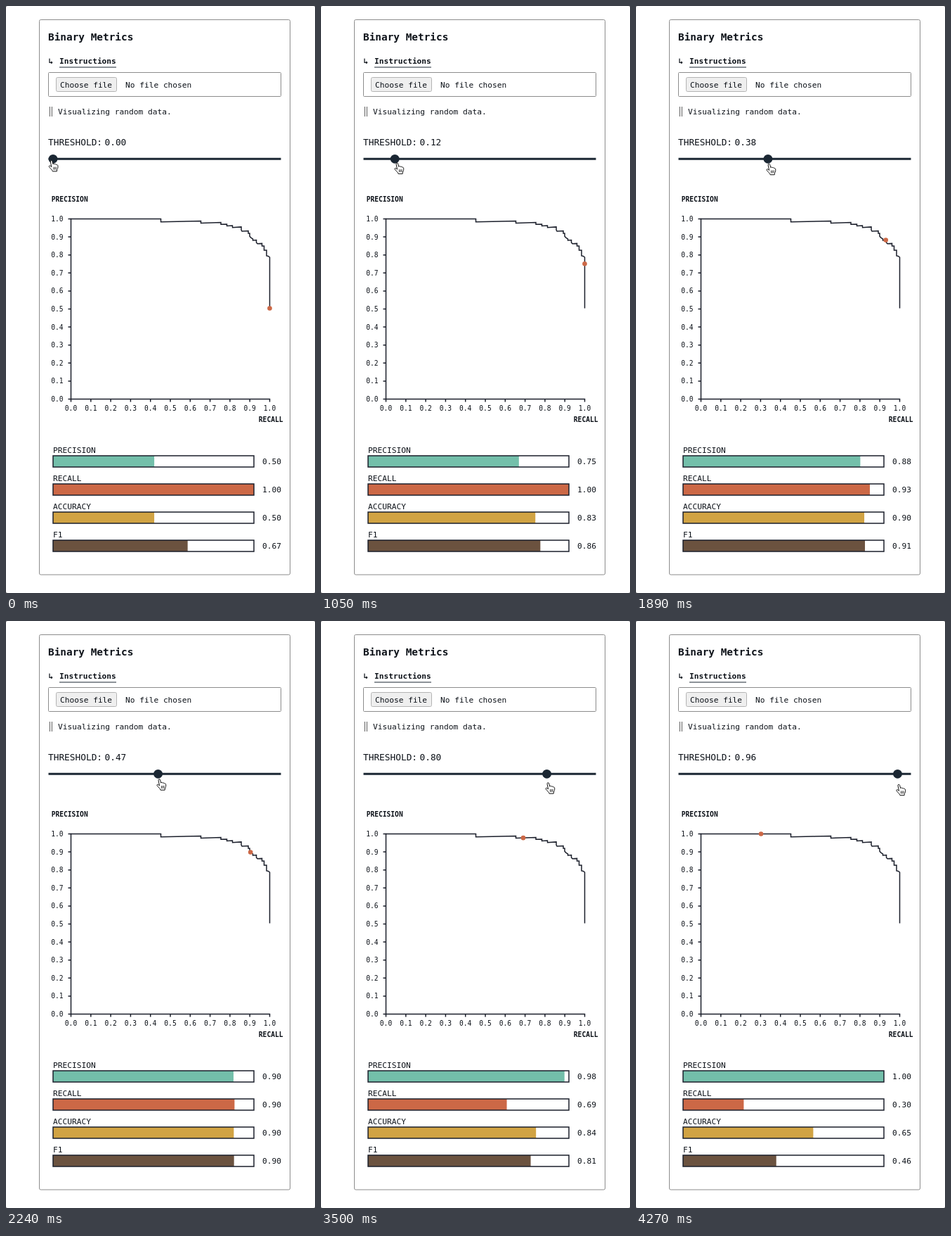
Recreate the animation shown at these times as an HTML page. Size 440x834 px, loop 4.34 s.

```html
<!DOCTYPE html>
<html lang="en">
<head>
<meta charset="utf-8">
<title>Binary Metrics</title>
<style>
  html, body { margin: 0; height: 100%; overflow: hidden; background: #888; }
  svg { display: block; width: 440px; height: 834px; font: 11.2px "DejaVu Sans Mono", monospace; }
  text { fill: #0c1118; white-space: pre; }
  .bold { font-weight: bold; }
  .title { font-size: 14.4px; }
  .large { font-size: 12.8px; }
  .small { font-size: 9.6px; }
  .box { fill: #fff; stroke: #8c8c8c; }
  .line { fill: none; stroke: #1b1f2b; stroke-width: 1.5; }
  .end { text-anchor: end; }
  .mid { text-anchor: middle; }
</style>
</head>
<body>
<svg id="stage" viewBox="0 0 440 834">
  <rect width="440" height="834" rx="2.5" fill="#fff"/>
  <rect class="box" x="47.5" y="19.5" width="357" height="788.5" rx="2"/>
  <text class="bold title" x="60" y="48.5">Binary Metrics</text>
  <text class="bold" x="60.5" y="82">↳</text>
  <text class="bold" x="76" y="82">Instructions</text>
  <path d="M76 87H157" stroke="#1b2733"/>
  <rect class="box" x="60.5" y="94.5" width="331" height="34" rx="1"/>
  <rect x="71.5" y="101.5" width="86" height="20" rx="2" fill="#efefef" stroke="#b4b4b4"/>
  <text x="77" y="115.5">Choose file</text>
  <text x="170" y="115.5">No file chosen</text>
  <path d="M62.4 143V157M65.4 143V157" stroke="#444" stroke-width=".9"/>
  <text x="74" y="154">Visualizing random data.</text>
  <text class="large" x="60" y="198">THRESHOLD:</text>
  <text class="large" x="140.5" y="198" id="threshold"></text>
  <path d="M60.5 217.3H391.5" stroke="#1b2733" stroke-width="3"/>
  <circle id="thumb" cy="217.3" r="6.4" fill="#1b2733"/>
  <text class="bold small" x="64.7" y="278.3">PRECISION</text>
  <text class="bold small end" x="394.5" y="590.5">RECALL</text>
  <g id="axes"></g>
  <path id="curve" class="line" d="M375.5 429.5V357L373.5 355.5 371 355V347H367.5V341H364.5V337.4L358 337.8
    356.5 336V332.5L351.5 333V331L349 329.3 347 327.3V323H345V319.5L336 320 335 318V313.9L322.5 314.7V312
    L314.5 312.5V310L306 310.3V307.5L277.5 308.5V305.5L220.5 306.8V302.5H92.5"/>
  <circle id="dot" r="3.3" fill="#cc6846"/>
  <g id="bars"></g>
  <g id="hand" stroke="#111" stroke-linecap="round" stroke-linejoin="round">
    <path fill="#fff" d="M4.3 9.6 2.9 2.4C2.6.5 5 .1 5.5 1.9L6.5 6C7 5.2 8.5 5.2 9 6.2 9.8 5.6 11 6 11.3 6.9
      12.4 6.5 13.4 7.2 13.5 8.4 13.8 11 13.1 12.3 12.2 14L12 16.2H5.9C5.5 14 3 12.6 .9 9.7 .3 8.4 2 7.6 3 8.6Z"/>
    <path stroke-width=".8" d="M7.3 10.5V13.5M9.1 10.4V13.5M10.9 10.3V13.4"/>
  </g>
</svg>
<script>
const $ = id => document.getElementById(id);
const STEP = 70, STEPS = 62, BASE_RATE = 0.504;
const LEFT = 92.5, BOTTOM = 558.5, PLOT_W = 283, PLOT_H = 256;

function add(parent, tag, attrs, text = "") {
  const el = document.createElementNS("http://www.w3.org/2000/svg", tag);
  for (const key in attrs) el.setAttribute(key, attrs[key]);
  el.textContent = text;
  parent.append(el);
  return el;
}

// Piecewise linear interpolation through [x, y] pairs
function lerp(keys, x) {
  const i = Math.max(1, keys.findIndex(k => k[0] >= x));
  const [x0, y0] = keys[i - 1], [x1, y1] = keys[i];
  return y0 + (y1 - y0) * (x - x0) / (x1 - x0);
}

// Step -> slider value, step -> hand height, threshold -> distance along the curve
const dragKeys = [[0, 0], [4, 0], [7, 0.008], [10, 0.03], [14, 0.1], [21, 0.27], [32, 0.47], [40, 0.6], [50, 0.8], [61, 0.96]];
const handKeys = [[0, 218.7], [1, 219.3], [4, 219.5], [10, 221.5], [21, 223], [32, 224], [40, 225.5], [50, 229], [61, 231.5]];
const curveKeys = [[0, 0], [0.03, 27.5], [0.08, 49], [0.15, 74], [0.27, 102.1], [0.47, 125.2], [0.6, 156.5], [0.8, 207.1], [0.9, 255], [0.96, 324.4]];

for (let i = 0; i <= 10; i++) {
  const x = LEFT + PLOT_W * i / 10, y = BOTTOM - PLOT_H * i / 10, label = (i / 10).toFixed(1);
  add($("axes"), "path", { class: "line", d: `M${x} ${BOTTOM}v4M${LEFT} ${y}h-4` });
  add($("axes"), "text", { class: "small mid", x, y: 574.5 }, label);
  add($("axes"), "text", { class: "small end", x: 81.5, y: y + 3.5 }, label);
}
add($("axes"), "path", { class: "line", d: "M92.5 301.8V558.5H376.2" });

const bars = [["PRECISION", "#73bfaa"], ["RECALL", "#cc6846"], ["ACCURACY", "#d1a343"], ["F1", "#6b523f"]].map(([name, fill], i) => {
  const y = 639 + 40 * i, g = $("bars");
  add(g, "text", { x: 67, y: y - 4 }, name);
  const bar = add(g, "rect", { x: 67, y, width: 0, height: 16, fill });
  add(g, "rect", { class: "line", x: 67, y, width: 286, height: 16 });
  return { bar, value: add(g, "text", { class: "end", x: 392, y: y + 12 }) };
});

const thumbX = value => 67 + 318.2 * value;

function draw(now) {
  const step = Math.floor(now / STEP) % STEPS;
  const drag = lerp(dragKeys, step);
  const threshold = Math.round(drag * 100) / 100;
  $("threshold").textContent = threshold.toFixed(2);
  $("thumb").setAttribute("cx", thumbX(threshold));

  const grip = 0.4 + 4.2 * Math.min(1, Math.max(0, (step - 4) / 4));
  $("hand").setAttribute("transform", `translate(${thumbX(drag) + grip - 7} ${lerp(handKeys, step)})`);

  const { x, y } = $("curve").getPointAtLength(lerp(curveKeys, threshold));
  $("dot").setAttribute("cx", x);
  $("dot").setAttribute("cy", y);

  const recall = (x - LEFT) / PLOT_W, precision = (BOTTOM - y) / PLOT_H;
  const hits = BASE_RATE * recall;
  const accuracy = 1 - (BASE_RATE - hits) - hits * (1 / precision - 1);
  const f1 = 2 * precision * recall / (precision + recall);
  [precision, recall, accuracy, f1].forEach((v, i) => {
    bars[i].bar.setAttribute("width", 286 * v);
    bars[i].value.textContent = v.toFixed(2);
  });
}

const start = performance.now();
function tick() {
  draw(performance.now() - start);
  requestAnimationFrame(tick);
}
tick();
</script>
</body>
</html>
```
